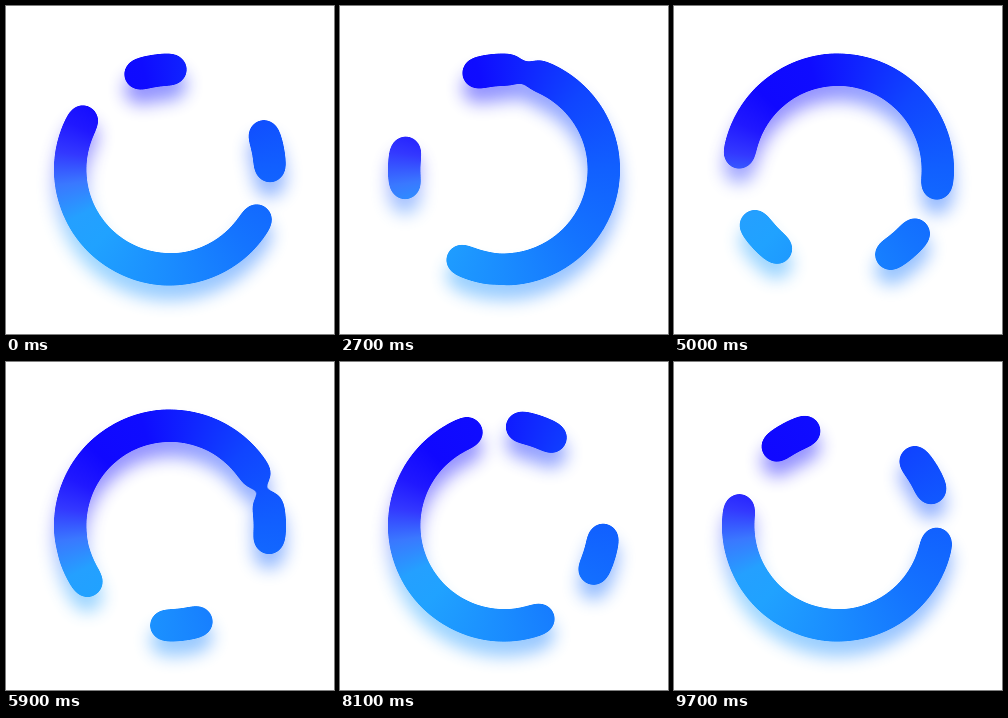
An HTML page for the animation above (9.8 s loop, 328 by 328 pixels).

```html
<!DOCTYPE html>
<html lang="en">
<head>
<meta charset="utf-8">
<title>Loader</title>
<style>
  html, body { margin: 0; width: 100%; height: 100%; overflow: hidden; background: #fff; }
  svg { display: block; width: 100vw; height: 100vh; }
  .hue {
    width: 328px;
    height: 328px;
    background: conic-gradient(from 90deg at 164px 163.5px,
      #1160ff 0deg, #1474ff 45deg, #1a8cff 90deg, #20a2ff 135deg, #24a0ff 153deg,
      #3a78ff 172deg, #3338ff 189deg, #2018ff 205deg, #1008ff 225deg,
      #0f0cff 255deg, #1028ff 285deg, #1045ff 315deg, #1160ff 360deg);
  }
</style>
</head>
<body>
<svg viewBox="0 0 328 328">
  <defs>
    <filter id="goo" filterUnits="userSpaceOnUse" x="0" y="0" width="328" height="328" color-interpolation-filters="sRGB">
      <feGaussianBlur stdDeviation="6"/>
      <feColorMatrix values="1 0 0 0 0  0 1 0 0 0  0 0 1 0 0  0 0 0 20 -8.5"/>
    </filter>
    <filter id="glow" filterUnits="userSpaceOnUse" x="0" y="0" width="328" height="328" color-interpolation-filters="sRGB">
      <feGaussianBlur stdDeviation="8.5"/>
      <feOffset dy="15"/>
      <feComponentTransfer result="shade"><feFuncA type="linear" slope=".45"/></feComponentTransfer>
      <feMerge><feMergeNode in="shade"/><feMergeNode in="SourceGraphic"/></feMerge>
    </filter>
    <mask id="shape" maskUnits="userSpaceOnUse" x="0" y="0" width="328" height="328">
      <g id="beads" filter="url(#goo)" fill="none" stroke="#fff" stroke-width="31" stroke-linecap="round"></g>
    </mask>
  </defs>
  <g filter="url(#glow)">
    <g mask="url(#shape)">
      <foreignObject width="328" height="328"><div class="hue"></div></foreignObject>
    </g>
  </g>
</svg>
<script>
const LOOP = 9800, TICK = 100;
const COUNT = 11;      // beads on the ring
const PITCH = 20;      // degrees between resting beads
const HEAD = 199.3;    // resting angle of the first bead to leave
const FLIGHT = 3.09;   // flight time in beats
const LEAD = 0.144;    // beats already flown at the start
const CX = 164, CY = 163.5, R = 100, HALF = 9.3;

const clamp = x => Math.min(1, Math.max(0, x));
const ease = x => (1 - Math.cos(Math.PI * clamp(x))) / 2;
const point = deg => {
  const a = deg * Math.PI / 180;
  return `${CX + R * Math.cos(a)} ${CY + R * Math.sin(a)}`;
};

const group = document.getElementById('beads');
const beads = Array.from({ length: COUNT }, () => {
  const path = document.createElementNS('http://www.w3.org/2000/svg', 'path');
  path.setAttribute('d', `M${point(-HALF)}A${R} ${R} 0 0 1 ${point(HALF)}`);
  return group.appendChild(path);
});

// Five ticks make a beat; the pace drags slightly twice per loop.
function beat(tick) {
  return (tick - clamp((tick - 20) / 12) - clamp((tick - 69) / 12)) / 5;
}

// Each bead leaves the front, flies over the gap and joins the back.
function angle(i, now) {
  const turn = Math.floor((now - i) / COUNT);
  const start = i + turn * COUNT;
  return HEAD - PITCH * start + (360 - PITCH * COUNT) * ease((now - start) / FLIGHT);
}

function draw(ms) {
  const now = beat(Math.floor((ms % LOOP) / TICK)) + LEAD;
  beads.forEach((bead, i) =>
    bead.setAttribute('transform', `rotate(${angle(i, now).toFixed(2)} ${CX} ${CY})`));
}

const begin = performance.now();
function loop() {
  draw(performance.now() - begin);
  requestAnimationFrame(loop);
}
draw(0);
requestAnimationFrame(loop);
</script>
</body>
</html>
```
